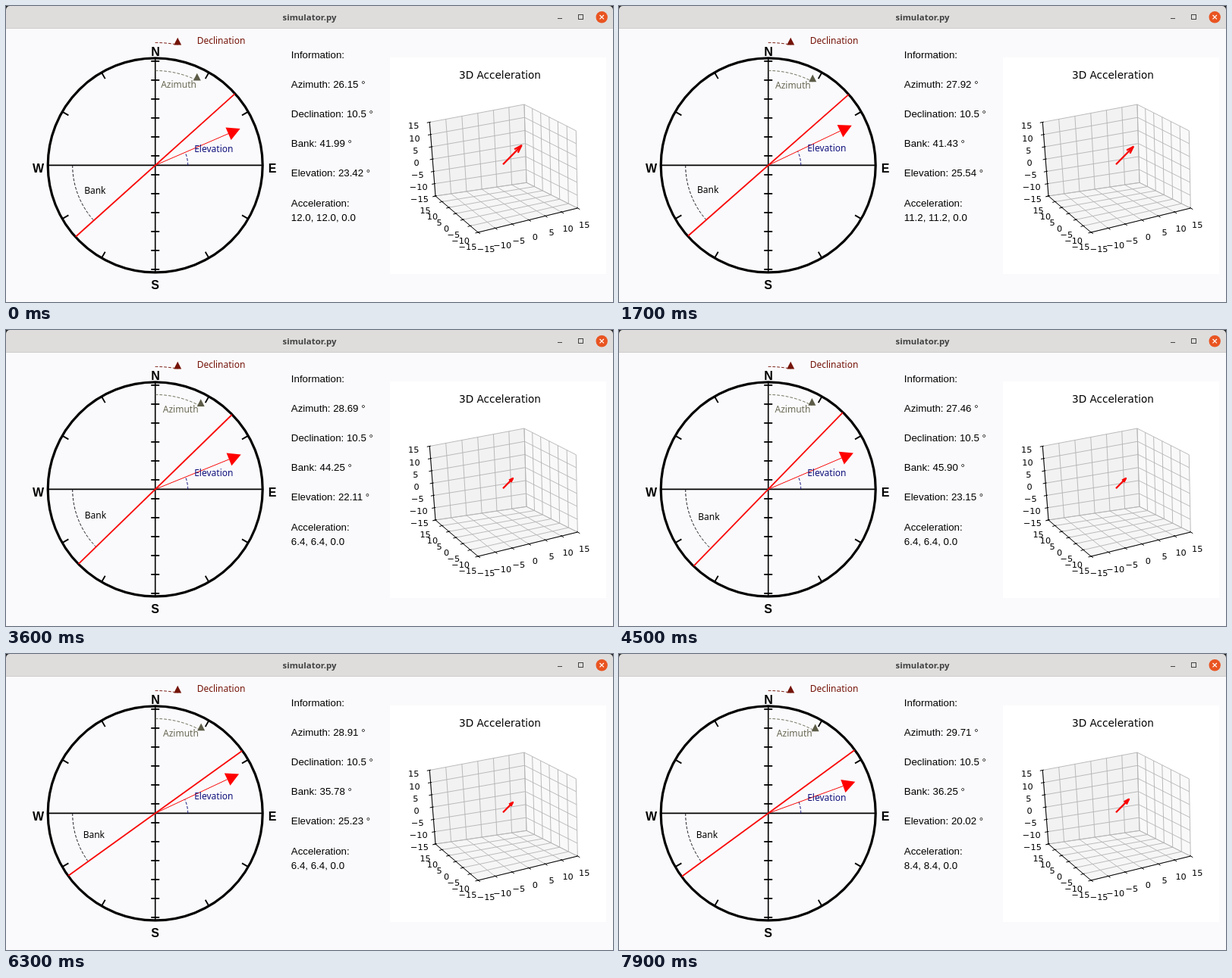
Recreate the animation shown at these times as an HTML page with a canvas. Size 800 by 391 pixels, loop 8 s.

```html
<!DOCTYPE html>
<html>
<head>
<meta charset="utf-8">
<title>simulator.py</title>
<style>
html, body { margin: 0; width: 100%; height: 100%; overflow: hidden; background: #fafafc; }
canvas { display: block; }
</style>
</head>
<body>
<canvas id="stage" width="800" height="391"></canvas>
<script>
const ctx = document.getElementById('stage').getContext('2d');
const LOOP = 8000, CX = 196.7, CY = 210.4, RAD = Math.PI / 180;
const ARIAL = '"Liberation Sans", Arial, sans-serif';
const NOTO = '"Noto Sans", "Open Sans", sans-serif';
const DEJAVU = '"DejaVu Sans", sans-serif';

// Sensor readings as [time, value] keys
const tracks = {
  azimuth: [[1000, 26.15], [2500, 29.95], [3600, 28.69], [5200, 26.51], [6300, 28.91], [7900, 29.71]],
  bank: [[600, 41.99], [1000, 41.43], [2500, 41.43], [3300, 44.25], [4200, 44.25], [4500, 45.9], [5100, 35.78], [6500, 35.78], [7800, 36.25]],
  elevation: [[200, 23.42], [1000, 25.54], [2500, 25.54], [3300, 22.11], [4200, 22.11], [5100, 25.23], [6500, 25.23], [7800, 20.02]],
  accel: [[1500, 12], [2500, 8.8], [3600, 6.4], [6900, 6.4], [7900, 8.4]]
};

function sample(keys, t) {
  if (t <= keys[0][0]) return keys[0][1];
  for (let i = 1; i < keys.length; i++) {
    const [t0, a] = keys[i - 1], [t1, b] = keys[i];
    if (t <= t1) return a + (b - a) * (t - t0) / (t1 - t0);
  }
  return keys[keys.length - 1][1];
}

function text(str, x, y, font, color = '#000', align = 'center') {
  ctx.font = font;
  ctx.fillStyle = color;
  ctx.textAlign = align;
  ctx.fillText(str, x, y);
}

function path(points, { stroke, width = 1, fill } = {}) {
  ctx.beginPath();
  points.forEach(p => ctx.lineTo(p[0], p[1]));
  if (fill) {
    ctx.closePath();
    ctx.fillStyle = fill;
    ctx.fill();
  }
  if (stroke) {
    ctx.strokeStyle = stroke;
    ctx.lineWidth = width;
    ctx.stroke();
  }
}

function circle(x, y, r) {
  ctx.beginPath();
  ctx.arc(x, y, r, 0, 2 * Math.PI);
}

// Angle in degrees, counter-clockwise from east
const polar = (r, deg) => [CX + r * Math.cos(deg * RAD), CY - r * Math.sin(deg * RAD)];

// Point on the edge a-b; depth is how much farther a lies than b
function along(a, b, u, depth = 1) {
  const v = u / (u + (1 - u) * depth);
  return [a[0] + (b[0] - a[0]) * v, a[1] + (b[1] - a[1]) * v];
}

function dashedArc(r, from, to, color, ccw = false) {
  ctx.beginPath();
  ctx.arc(CX, CY, r, -from * RAD, -to * RAD, ccw);
  ctx.setLineDash([3.6, 2.2]);
  ctx.strokeStyle = color;
  ctx.lineWidth = 1;
  ctx.stroke();
  ctx.setLineDash([]);
}

function marker([x, y], color) {
  path([[x - 5, y + 0.3], [x + 5, y + 0.3], [x, y - 9.4]], { fill: color });
}

function drawTitleBar() {
  ctx.fillStyle = '#222';
  ctx.fillRect(0, 0, 800, 10);
  ctx.beginPath();
  ctx.roundRect(0, 0, 800, 30, [5, 5, 0, 0]);
  ctx.fillStyle = '#dedddc';
  ctx.fill();
  path([[0, 29.5], [800, 29.5]], { stroke: '#cfcdcc' });
  text('simulator.py', 400, 19, 'bold 11.4px ' + NOTO, '#414141');
  path([[727, 16.5], [733, 16.5]], { stroke: '#444' });
  ctx.lineWidth = 1;
  ctx.strokeRect(754.5, 11.5, 6, 6);
  circle(785.2, 14.7, 7.7);
  ctx.fillStyle = '#e95420';
  ctx.fill();
  path([[782.5, 12], [787.9, 17.4]], { stroke: '#fff', width: 1.2 });
  path([[787.9, 12], [782.5, 17.4]], { stroke: '#fff', width: 1.2 });
}

function drawCompass({ azimuth, bank, elevation }) {
  const black = { stroke: '#000', width: 1.8 };
  path([[55, CY], [338, CY]], black);
  path([[CX, 69], [CX, 351]], { stroke: '#000', width: 1.6 });
  for (let i = 0; i < 12; i++) {
    const y = CY + (i - 5.5) * 25;
    path([[191.2, y], [202.2, y]], black);
    if (i % 3) path([polar(132, i * 30), polar(141, i * 30)], black);
  }
  circle(CX, CY, 141.5);
  ctx.strokeStyle = '#000';
  ctx.lineWidth = 3.2;
  ctx.stroke();
  const bold = 'bold 16px ' + ARIAL;
  text('N', 197, 65.5, bold);
  text('S', 196.5, 373.5, bold);
  text('W', 42.5, 219.5, bold);
  text('E', 351, 219.5, bold);

  const label = '12px ' + NOTO;
  const red = '#f90808', olive = '#6a6955', navy = '#10107c', maroon = '#751409';
  dashedArc(162, 90, 79.5, maroon);
  marker(polar(162, 79.5), maroon);
  text('Declination', 283.5, 49.5, label, maroon);

  dashedArc(125, 90, 90 - azimuth, olive);
  marker(polar(125, 90 - azimuth), '#5c5b47');
  const azHalf = azimuth / 2 * RAD;
  text('Azimuth', CX + 3 + 123 * Math.sin(azHalf), CY + 3.3 - 108 * Math.cos(azHalf), label, olive);

  dashedArc(109, 180, 180 + bank, '#15151f', true);
  path([polar(141, bank), polar(141, bank + 180)], { stroke: red, width: 1.8 });
  const bankHalf = bank / 2 * RAD;
  text('Bank', CX - 85 * Math.cos(bankHalf), CY + 3.1 + 95 * Math.sin(bankHalf), label);

  dashedArc(43, 0, elevation, navy, true);
  const neck = polar(105, elevation);
  const dx = 9 * Math.sin(elevation * RAD), dy = 9 * Math.cos(elevation * RAD);
  path([[CX, CY], neck], { stroke: red });
  path([[neck[0] - dx, neck[1] - dy], [neck[0] + dx, neck[1] + dy], polar(122, elevation)], { fill: '#f00' });
  text('Elevation', 273.8, 203.2 - 52 * Math.sin(elevation / 2 * RAD), label, navy);
}

function drawInfo({ azimuth, bank, elevation, accel }) {
  const a = accel.toFixed(1), font = '13.3px ' + ARIAL;
  [
    'Information:',
    `Azimuth: ${azimuth.toFixed(2)} °`,
    'Declination: 10.5 °',
    `Bank: ${bank.toFixed(2)} °`,
    `Elevation: ${elevation.toFixed(2)} °`,
    'Acceleration:'
  ].forEach((line, i) => text(line, 375.8, 68.5 + i * 39.2, font, '#000', 'left'));
  text(`${a}, ${a}, 0.0`, 375.8, 284.3, font, '#000', 'left');
}

// Corners of the plot box
const topLeft = [558.3, 153.5], topBack = [683, 130], topRight = [751.3, 164.8];
const left = [566, 251], back = [686, 233.3], right = [753.3, 267], front = [622, 299];
const DEPTH_X = 0.965, DEPTH_Y = 1.08;

function drawPlot(accel) {
  ctx.fillStyle = '#fff';
  ctx.fillRect(506, 68, 285, 286);
  text('3D Acceleration', 651, 96, '13.6px ' + DEJAVU);

  path([topLeft, topBack, back, left], { fill: '#f2f2f2' });
  path([topBack, topRight, right, back], { fill: '#f9f9f9' });
  path([left, back, right, front], { fill: '#f6f6f6' });

  const marks = [0, 1, 2, 3, 4, 5, 6].map(i => ({
    u: i / 6,
    x: along(front, right, i / 6, DEPTH_X),
    y: along(left, front, i / 6, DEPTH_Y),
    z: along(left, topLeft, i / 6)
  }));
  const grid = { stroke: '#b4b4b4', width: 0.9 };
  for (const { u, x, y, z } of marks) {
    path([along(topLeft, topBack, u, DEPTH_X), along(left, back, u, DEPTH_X), x], grid);
    path([along(topBack, topRight, u, DEPTH_Y), along(back, right, u, DEPTH_Y), y], grid);
    path([z, along(back, topBack, u), along(right, topRight, u)], grid);
  }
  path([topLeft, left, front, right], { stroke: '#000' });

  const font = '11.3px ' + DEJAVU, tick = { stroke: '#000' };
  const name = v => String(v).replace('-', '\u2212');
  marks.forEach(({ x, y, z }, i) => {
    path([[x[0] - 1, x[1] - 1], [x[0] + 3, x[1] + 1.8]], tick);
    path([[y[0] + 1.5, y[1] - 0.4], [y[0] - 3.5, y[1] + 0.9]], tick);
    path([[z[0] + 1.5, z[1] - 0.3], [z[0] - 3.5, z[1] + 0.7]], tick);

    const up = name(i * 5 - 15), down = name(15 - i * 5);
    text(up, 632.6 + i * 21.6, 325 - i * 5.4, font);
    text(down, 552.6 + i * 9.3, 274 + i * 8, font);
    text(up, 545 - i * 1.3, 259 - i * 16.1, font);
  });

  const tail = [655, 209.3], dx = 2.03 * accel, dy = -2.08 * accel;
  const tip = [tail[0] + dx, tail[1] + dy];
  const barb = deg => {
    const c = 0.3 * Math.cos(deg * RAD), s = 0.3 * Math.sin(deg * RAD);
    return [tip[0] - dx * c + dy * s, tip[1] - dx * s - dy * c];
  };
  const red = { stroke: '#f80505', width: 2.3 };
  ctx.lineJoin = 'round';
  path([tail, tip], red);
  path([barb(18), tip, barb(-18)], red);
  ctx.lineJoin = 'miter';
}

function draw(t) {
  // The simulator refreshes ten times a second
  const now = Math.floor(t / 100) * 100;
  const state = {};
  for (const key in tracks) state[key] = sample(tracks[key], now);
  state.accel = Math.round(state.accel / 0.4) * 0.4;

  ctx.fillStyle = '#fafafc';
  ctx.fillRect(0, 0, 800, 391);
  drawTitleBar();
  drawCompass(state);
  drawInfo(state);
  drawPlot(state.accel);
}

const start = performance.now();
function loop() {
  draw((performance.now() - start) % LOOP);
  requestAnimationFrame(loop);
}
loop();
</script>
</body>
</html>
```
